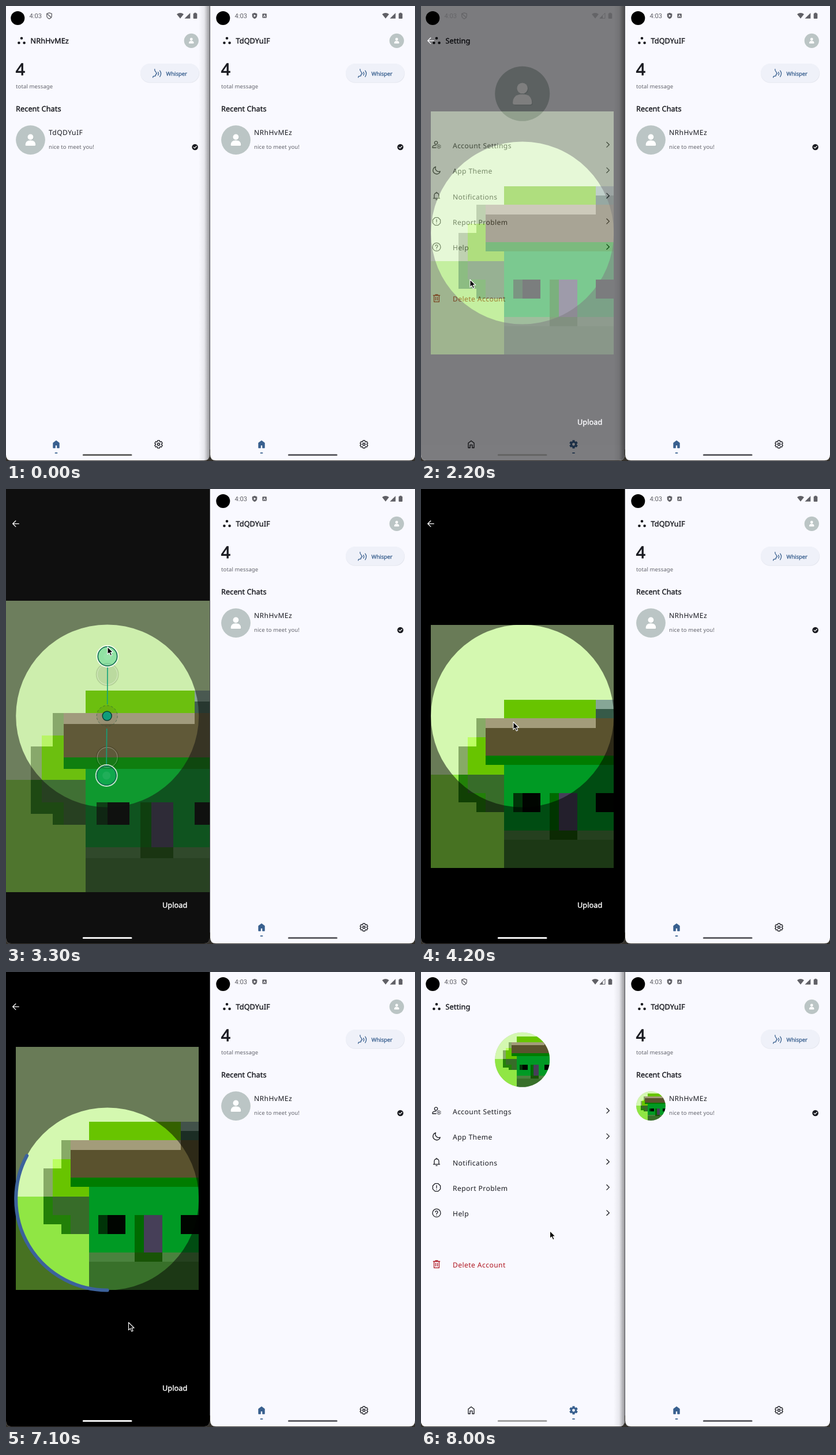
Animation of 709 by 790 pixels, one loop 8.19 s. Source, as an HTML page:

```html
<!DOCTYPE html>
<html lang="en">
<head>
<meta charset="utf-8">
<title>Profile picture upload</title>
<style>
  html, body { margin: 0; width: 100%; height: 100%; overflow: hidden; background: #34312c; }
  svg { display: block; width: 709px; height: 790px; }
  text { font-family: "Noto Sans", sans-serif; white-space: pre; text-rendering: geometricPrecision; }
  .line { fill: none; stroke: currentColor; stroke-width: 1.3; stroke-linecap: round; stroke-linejoin: round; }
</style>
</head>
<body>
<svg id="stage" viewBox="0 0 709 790"></svg>
<script>
const INK = '#1a1b21', MUTED = '#63646c', BLUE = '#39608f', PAPER = '#f9f9ff', RED = '#b01822';
const LEFT_USER = 'NRhHvMEz', RIGHT_USER = 'TdQDYuIF';
const LOOP = 8190, CX = 175.7, CY = 394, R = 158.5;

// ---------- markup helpers ----------
const at = (x, y, body, extra = '') => `<g transform="translate(${x} ${y})" ${extra}>${body}</g>`;
// A thin outline in the text colour gives a medium weight.
const text = (x, y, s, size, { fill = INK, gap = 0, font = '', medium = false } = {}) =>
  `<text x="${x}" y="${y}" font-size="${size}" fill="${fill}" letter-spacing="${gap}"` +
  `${medium ? ` stroke="${fill}" stroke-width="${size * .032}"` : ''}${font && ` style="font-family:${font}"`}>${s}</text>`;
const circle = (x, y, r, fill, extra = '') => `<circle cx="${x}" cy="${y}" r="${r}" fill="${fill}" ${extra}/>`;
const rect = (x, y, w, h, fill, extra = '') =>
  `<rect x="${x}" y="${y}" width="${w}" height="${h}" fill="${fill}" ${extra}/>`;
const line = (d, color = INK, extra = '') => `<path class="line" d="${d}" color="${color}" ${extra}/>`;
const solid = (d, fill, extra = '') => `<path d="${d}" fill="${fill}" ${extra}/>`;
const title = (x, y, s, fill) => text(x, y, s, 12.7, { medium: true, gap: .08, fill });
const body = (x, y, s, fill) => text(x, y, s, 12.1, { gap: .42, fill });
const small = (x, y, s) => text(x, y, s, 9.5, { gap: .12, fill: MUTED });

// ---------- icons, centred on 0,0 ----------
const polar = (r, deg) => {
  const a = deg * Math.PI / 180;
  return (r * Math.cos(a)).toFixed(2) + ' ' + (r * Math.sin(a)).toFixed(2);
};
const gearPath = (scale = 1) => 'M' + [0, 1, 2, 3, 4, 5].flatMap(i =>
  [[5.2, -23], [7.1, -15], [7.1, 15], [5.2, 23]].map(([r, d]) => polar(r * scale, i * 60 - 90 + d))).join('L') + 'Z';
const gear = active => active
  ? solid(gearPath(1.06) + 'M-2.4 0a2.4 2.4 0 1 0 4.8 0a2.4 2.4 0 1 0-4.8 0Z', BLUE, 'fill-rule="evenodd"')
  : line(gearPath(.98)) + circle(0, 0, 2, 'none', `stroke="${INK}" stroke-width="1.6"`);
const house = active => {
  const d = 'M-5 6V-2.2L0-6 5-2.2V6H1.9V1.2H-1.9V6Z';
  return active ? solid(d, BLUE, `stroke="${BLUE}" stroke-width="1.4" stroke-linejoin="round"`) : line(d);
};
const shield = 'M0-5.2L4.3-3.6V-.5Q4.3 3.6 0 5.3Q-4.3 3.6-4.3-.5V-3.6Z';
const dots = circle(27, 56, 2.3, INK) + circle(22.4, 64, 2.3, INK) + circle(31.6, 64, 2.3, INK);
const avatar = (x, y, r) => at(x, y, `<g transform="scale(${r / 47.5})">` + circle(0, 0, 47.5, '#bbc5c5') +
  ['#a9b4b4', '#fff'].map((fill, i) => at(i ? 0 : 1.3, i ? 0 : 1.5,
    circle(0, -9.5, 9.3, fill) + solid('M-16.5 16Q-16.5 1 0 1T16.5 16Q16.5 19 13 19H-13Q-16.5 19-16.5 16Z', fill))).join('') + '</g>');
const settingIcons = [
  line('M-1-6.2a2.7 2.7 0 1 0 .1 0M-7 5V3.5Q-6.5 .8-1.2 .8M-7 5H-1') + at(4, 3, `<g transform="scale(.5)">${gear(false)}</g>`),
  line('M-1.5-6.2A6.4 6.4 0 1 0 6.3 1.8A6 6 0 0 1-1.5-6.2Z'),
  line('M-5.5 4.2H5.5M-4 4.2V-1a4 4.2 0 0 1 8 0V4.2M0-5.2V-6.6M-1 6.5H1'),
  line('M-2.8-6.6H2.8L6.6-2.8V2.8L2.8 6.6H-2.8L-6.6 2.8V-2.8ZM0-3.4V.8M0 3.2V3.3'),
  line('M-7 0a7 7 0 1 0 14 0a7 7 0 1 0-14 0M-2-1.6a2 2 0 1 1 3.2 1.6Q0 .8 0 1.8M0 3.8V3.9')
];
const trash = line('M-5.6-5H5.6M-2-5V-6.4H2V-5M-4.4-5V6.2H4.4V-5M-1.5-2V3.3M1.5-2V3.3', RED);
const whisper = line('M-4.2-7.4Q-4.6-4.6-2.6-3L-.4 .6L-2.5 1.5V3.2Q-2.5 4.6-4.6 4.6Q-7.4 4.6-7.4 7' +
  'M1.6-2.2Q3.6 .4 1.6 3.2M4.6-4.8Q8.6 .4 4.6 5.8', BLUE);

// ---------- the cropped picture, on a 20 x 26 cell grid ----------
const cells = [
  ['#d4f8b0', 0, 0, 20, 16], ['#90e644', 0, 16, 8, 10],
  ['#68c400', 8, 8, 10, 3], ['#68c400', 5, 12, 3, 4], ['#68c400', 4, 13, 1, 3],
  ['#87aa66', 5, 10, 1, 2], ['#87aa66', 3, 13, 1, 3], ['#bcff62', 4, 12, 1, 1],
  ['#228008', 3, 16, 3, 3], ['#228008', 5, 19, 1, 1],
  ['#376c29', 4, 16, 4, 2], ['#376c29', 6, 18, 2, 2],
  ['#86a696', 18, 8, 2, 1], ['#365a48', 18, 9, 2, 1],
  ['#a39c7a', 6, 10, 12, 1], ['#5a522e', 6, 11, 14, 3], ['#5a522e', 18, 10, 2, 1],
  ['#007c00', 6, 14, 14, 1], ['#009a24', 8, 15, 12, 7],
  ['#4a823e', 8, 22, 12, 1], ['#38702a', 8, 23, 12, 3],
  ['#003408', 9, 18, 1, 2], ['#000500', 10, 18, 2, 2], ['#000500', 18, 18, 2, 2],
  ['#006a00', 13, 18, 1, 4], ['#463f58', 14, 18, 2, 4], ['#185406', 13, 22, 3, 1]
];
const art = `<g id="art" shape-rendering="crispEdges" transform="translate(-158.5 -211) scale(15.85 16.23)">` +
  cells.map(([fill, ...box]) => rect(...box, fill)).join('') + '</g>';
const face = (x, y, r) => at(x, y, `<g transform="scale(${r / R}) translate(0 -53)">` +
  `<g clip-path="url(#round)"><use href="#art"/></g></g>`, 'class="face"');

// ---------- screens ----------
const statusBar = (extras, weakSignal) => {
  const c = '#606066';
  return text(40.5, 21, '4:03', 11.2, { fill: c, font: 'Roboto, sans-serif' }) + extras(c) +
    solid('M296 14.3Q302 9.5 308 14.3L302 21.8Z', c) +
    (weakSignal ? line('M319 12.7V21.3H310.4Z', c, 'style="stroke-width:1"') + solid('M315 16.5V21.3H310.4Z', c) : solid('M319.3 12V21.8H309.5Z', c)) +
    rect(324.7, 12.8, 6.6, 9.2, c, 'rx="1"') + rect(326.4, 11.7, 3.2, 2, c);
};
const outlineShield = c => at(75, 17, line(shield, c) + line('M-3.5-3.3L3.4 3', c));
const rightExtras = c => at(75, 17, solid(shield, c) + solid('M-1.3-2.2L2.3 0L-1.3 2.2Z', PAPER)) +
  rect(88.4, 13.3, 7.4, 7.4, c, 'rx="1"') + line('M90.4 19L92.1 15L93.8 19M91 17.8H93.2', PAPER, 'style="stroke-width:.9"');
const camera = circle(20.3, 21, 12, '#000');
const navBar = active => at(87, 761, house(active === 'home')) + at(264.5, 761, gear(active === 'settings')) +
  rect(active === 'home' ? 84.6 : 262.1, 775.3, 4.8, 1.7, BLUE, 'rx=".8"');
const paper = rect(-2, 0, 358, 790, PAPER);

const home = (user, friend) => camera + dots + title(42.5, 64.7, user) + avatar(321.3, 60.3, 12.6) +
  text(16.8, 120.3, '4', 28.2, { medium: true }) + small(17, 143, 'total message') +
  rect(233, 100.6, 102.2, 33, '#e5e7ef', 'rx="16.5"') + rect(233, 100, 101.5, 32.5, '#eff1f9', 'rx="16.2"') +
  at(262, 117, whisper) + text(277.6, 120.6, 'Whisper', 9.4, { medium: true, fill: BLUE }) +
  title(17, 183, 'Recent Chats') + avatar(42.5, 232.6, 25.4) + body(74, 224, friend) +
  small(74, 247.6, 'nice to meet you!') + circle(327.6, 245, 5.3, INK) +
  line('M325.2 245.1L327 246.9L330.2 243.5', '#fff') + navBar('home');

const settings = camera + dots + title(42.5, 64.7, 'Setting') + avatar(CX, 152.3, 47.5) + face(CX, 152.3, 47.5) +
  ['Account Settings', 'App Theme', 'Notifications', 'Report Problem', 'Help'].map((label, i) => {
    const y = 242 + 44.35 * i;
    return at(27, y - 1, settingIcons[i]) + body(55, y + 4.8, label) + at(324.2, y - 1.2, line('M-2.3-4.3L2.1 0L-2.3 4.3'));
  }).join('') + at(27, 507.5, trash) + body(55, 513, 'Delete Account', RED) + navBar('settings');

const knob = id => `<g id="${id}">` + circle(0, 0, 18.4, 'none', 'stroke="#fff" stroke-opacity=".75" stroke-width="2"') +
  circle(0, 0, 16.7, 'rgba(20,200,140,.32)', 'stroke="#0b6b4e" stroke-width="1.6"') +
  circle(0, 0, 7, 'rgba(255,255,255,.07)') + '</g>';
const ghost = y => circle(CX, y, 17.5, 'rgba(80,90,70,.14)', 'stroke="#fff" stroke-opacity=".35"') +
  circle(CX, y, 19, 'none', 'stroke="#000" stroke-opacity=".12" stroke-width="2"');
const pinch = `<g id="pinch">` + rect(0, 0, 353, 790, 'rgba(150,150,150,.1)') + ghost(322) + ghost(466) +
  `<path id="rods" stroke="#12a27c" stroke-width="1.6"/>` +
  circle(CX - .5, CY, 18, 'rgba(60,50,30,.1)', 'stroke="#2a5a40" stroke-opacity=".6" stroke-dasharray="4 3"') +
  circle(CX - .5, CY, 8, '#0f9c7b', 'stroke="#0a3f33" stroke-width="1.5"') + knob('upper') + knob('lower') + '</g>';

const crop = rect(0, 0, 353, 790, '#000') + `<g id="picture"><use href="#art"/></g>` +
  solid(`M0 0H353V790H0ZM${CX - R} ${CY}a${R} ${R} 0 1 0 ${2 * R} 0a${R} ${R} 0 1 0 ${-2 * R} 0Z`, 'rgba(0,0,0,.5)', 'fill-rule="evenodd"') +
  `<path id="progress" fill="none" stroke="#3c629c" stroke-width="6" stroke-linecap="round"/>` + pinch +
  line('M22.3 60.3H12M16.8 55.2L11.7 60.3L16.8 65.4', '#fff') + title(271, 727, 'Upload', '#fff');

const bar = (id, fill) => rect(132.8, 777.9, 85.7, 3.1, fill, `rx="1.5" id="${id}"`);
const $ = id => document.getElementById(id);
$('stage').innerHTML = `<defs>${art}
  <clipPath id="round"><circle cy="53" r="${R}"/></clipPath>
  <clipPath id="leftPhone"><path d="M0 0H353V779Q353 789 343 789H9Q0 789 0 779Z"/></clipPath>
  <clipPath id="rightPhone"><path d="M-2 0H353V779Q353 789 343 789H8Q-2 789-2 779Z"/></clipPath>
  <linearGradient id="edge"><stop stop-opacity="0"/><stop offset=".5" stop-opacity=".07"/><stop offset="1" stop-opacity=".4"/></linearGradient>
  </defs>` + rect(0, 0, 709, 790, '#34312c') + rect(352, 0, 4, 770, '#55555a') +
  `<g clip-path="url(#leftPhone)">${paper}
    <g id="home">${statusBar(outlineShield) + home(LEFT_USER, RIGHT_USER)}</g>
    <g id="settings">${paper}<g id="leftStatus">${statusBar(outlineShield, true)}</g>${settings}</g>
    ${rect(334, 0, 19, 790, 'url(#edge)')}
    <g id="crop">${crop}</g>${bar('leftBar')}</g>` +
  at(356, 0, `<g clip-path="url(#rightPhone)">${paper + statusBar(rightExtras) + home(RIGHT_USER, LEFT_USER)}
    ${face(42.5, 232.6, 25.4) + bar('rightBar', '#606066')}</g>`) +
  `<path id="cursor" d="M0 0V13.2L3 10.4L5.2 15.4L7.6 14.4L5.4 9.5H9.6Z" fill="#000" stroke="#fff" stroke-width="1.1" stroke-linejoin="round"/>`;

// ---------- motion ----------
// Eased interpolation through [time, value, value...] keys.
function track(t, keys) {
  const next = keys.findIndex(k => k[0] > t);
  if (next < 1) return (next ? keys.at(-1) : keys[0]).slice(1);
  const a = keys[next - 1], b = keys[next];
  const u = (t - a[0]) / (b[0] - a[0]), e = u * u * (3 - 2 * u);
  return a.slice(1).map((v, i) => v + (b[i + 1] - v) * e);
}
const cursorKeys = [
  [100, 676, 772], [600, 262, 758], [900, 262, 758], [1500, 171, 157], [1700, 171, 157],
  [2200, 85, 475], [2450, 85, 475], [2850, 176, 306], [3300, 176, 274], [3450, 176, 272],
  [4200, 160, 404.5], [4400, 150, 447], [5000, 150, 342], [5200, 150, 342], [5450, 291, 722],
  [5600, 291, 722], [6050, 212.5, 608.5], [7200, 212.5, 608.5], [7700, 223.5, 449.5]
];
// Vertical offset and zoom of the picture behind the crop circle.
const pictureKeys = [
  [2500, 0, 1], [2850, 30, 1], [3300, 53, 1.197], [3450, 53, 1.2], [3900, 53, 1], [4400, 53, 1], [5050, -53, 1]
];
const set = (id, name, value) => $(id).setAttribute(name, value);
const move = (id, x, y, zoom = 1) => set(id, 'transform', `translate(${x} ${y}) scale(${zoom})`);
const fade = (id, t, keys) => set(id, 'opacity', track(t, keys)[0]);
const show = (node, on) => { node.style.display = on ? '' : 'none'; };

function draw(now) {
  const t = Math.min(8000, Math.floor(now % LOOP / 100) * 100);

  fade('settings', t, [[700, 0], [1000, 1]]);
  fade('crop', t, [[2100, 0], [2300, 1], [7300, 1], [7500, 0]]);
  fade('leftStatus', t, [[1450, 1], [1600, .3], [7000, .3], [7700, 1]]);
  const g = Math.round(track(t, [[2450, 100], [2700, 240], [7750, 240], [8000, 160]])[0]);
  set('leftBar', 'fill', `rgb(${g},${g},${g})`);
  document.querySelectorAll('.face').forEach(node => show(node, t >= 8000));

  const [offset, zoom] = track(t, pictureKeys);
  move('picture', CX, CY + offset, zoom);

  show($('pinch'), t >= 2750 && t < 3500);
  const [spread] = track(t, [[2850, 72], [3300, 103.5], [3450, 106]]);
  move('upper', CX + .3, CY - spread);
  move('lower', CX - 1.5, CY + spread);
  set('rods', 'd', `M${CX + .3} ${CY - spread + 18}L${CX} ${CY - 20}M${CX - 1} ${CY + 22}L${CX - 1.5} ${CY + spread - 18}`);

  const sweep = (t - 5490) * .0735;
  show($('progress'), sweep > 0);
  const end = polar(R, 90 + Math.max(0, sweep)).split(' ').map(Number);
  set('progress', 'd', `M${CX} ${CY + R}A${R} ${R} 0 ${sweep > 180 ? 1 : 0} 1 ${CX + end[0]} ${CY + end[1]}`);

  show($('cursor'), t >= 100);
  move('cursor', ...track(t, cursorKeys));
}
function tick() {
  draw(performance.now());
  requestAnimationFrame(tick);
}
tick();
</script>
</body>
</html>
```
